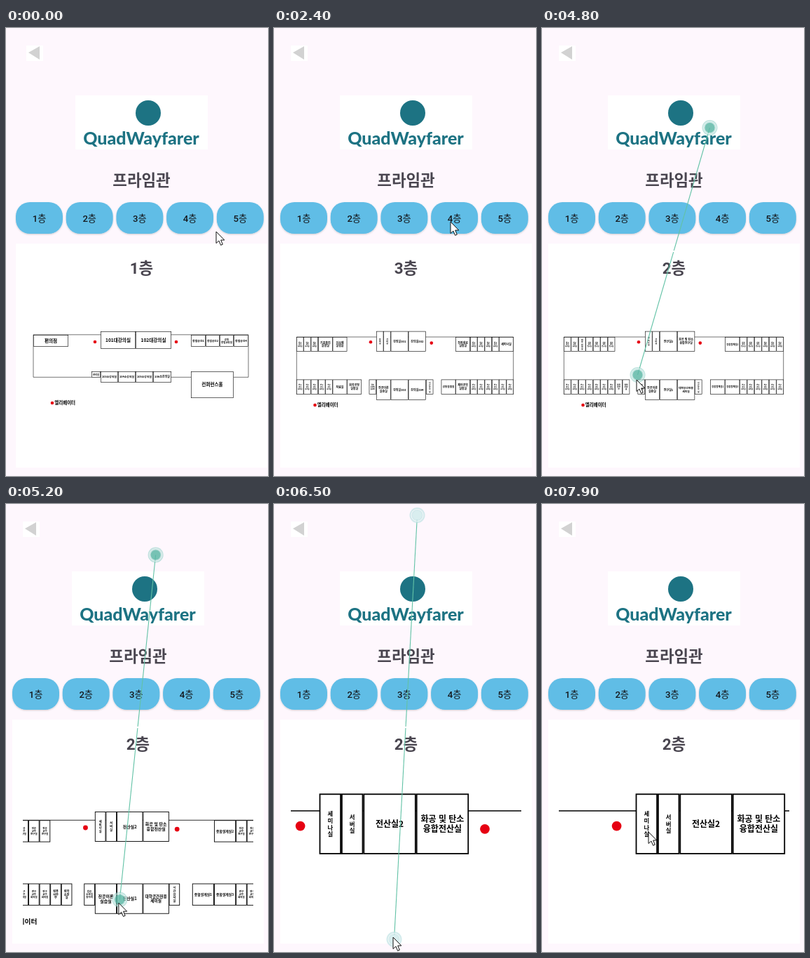
These frames come from a looping animation (374x638 px, 8 s). An HTML page:

```html
<!DOCTYPE html>
<html lang="ko">
<head>
<meta charset="utf-8">
<style>
html, body { margin: 0; width: 100%; height: 100%; overflow: hidden; background: #fef7fd; }
svg { display: block; width: 374px; height: 638px; }
text { font-family: Roboto, 'Noto Sans CJK KR', 'Noto Sans CJK', sans-serif; text-anchor: middle; }
.title { font-size: 22.4px; font-weight: 700; fill: #49454f; }
.button { font-size: 13.2px; font-weight: 500; fill: #15181c; }
.brand { font: 800 25px Lato, sans-serif; fill: #1d7383; }
.room { fill: #fff; stroke: #000; stroke-width: .6; }
.wall { fill: none; stroke: #000; stroke-width: .55; }
.label { font-family: 'Noto Sans CJK KR', 'Noto Sans CJK', sans-serif; font-weight: 700; }
.dot { fill: #e60012; }
</style>
</head>
<body>
<svg viewBox="0 0 374 638">
  <defs>
    <clipPath id="viewport"><rect x="24" y="365" width="329" height="246"/></clipPath>
    <filter id="shadow" x="-10%" y="-10%" width="120%" height="130%">
      <feDropShadow dx="0" dy="1" stdDeviation="1" flood-color="#000" flood-opacity=".18"/>
    </filter>
    <g id="touch">
      <circle r="11" fill="#8fd0c6" opacity=".55"/>
      <circle r="9" fill="none" stroke="#fff" stroke-opacity=".6"/>
      <circle r="7" fill="#4fb09c" opacity=".65"/>
    </g>
    <g id="hover">
      <circle r="11" fill="#c4e4e6" opacity=".75"/>
      <circle r="8.5" fill="none" stroke="#fff" stroke-opacity=".7"/>
      <circle r="6.5" fill="#d9eeef"/>
    </g>
  </defs>
  <rect width="374" height="638" fill="#fef7fd"/>
  <g id="screen">
    <rect x="24" y="25" width="24" height="22" fill="#fff"/>
    <path d="M27 35L43 26V45Z" fill="#d2d2d2"/>
    <rect x="94" y="96" width="189" height="77" fill="#fff"/>
    <circle cx="198" cy="121" r="18" fill="#1d7383"/>
    <text class="brand" x="188" y="166">QuadWayfarer</text>
    <text class="title" x="188.5" y="225">프라임관</text>
    <g id="buttons"></g>
    <rect x="9" y="307" width="359" height="319" fill="#fff"/>
    <text class="title" x="188.5" y="350" id="level"></text>
    <g clip-path="url(#viewport)"><g id="plan"></g></g>
  </g>
  <g id="pinch">
    <line id="span" stroke="#62c2a6" stroke-width="1.1"/>
    <circle cx="188" cy="318" r="1.2" fill="#fff"/>
    <use id="finger"/>
    <use id="mirror"/>
  </g>
  <path id="cursor" d="M0 0V16.5L3.9 13L6.6 19.3L9.3 18.1L6.7 12H11.8Z" fill="#fff" stroke="#111" stroke-linejoin="round"/>
</svg>
<script>
const LOOP = 8000, STEP = 100;
const $ = id => document.getElementById(id);

const charWidth = c => c === ' ' ? .22 : /\d/.test(c) ? .6 : .92;
const emWidth = s => [...s].reduce((sum, c) => sum + charWidth(c), 0);

function room(x, y, w, h, label, cap) {
  const lines = label.split('/');
  const widest = Math.max(...lines.map(emWidth));
  const limit = w < 12 ? 2.8 : cap;
  const size = Math.min(limit, (w - 4) / widest, (h - 2) / lines.length / 1.15);
  const text = lines.map((line, i) => {
    const ty = y + h / 2 + (i - (lines.length - 1) / 2) * size * 1.17 + size * .36;
    return `<text class="label" font-size="${size}" x="${x + w / 2}" y="${ty}">${line}</text>`;
  }).join('');
  return `<rect class="room" x="${x + .3}" y="${y + .3}" width="${w - .6}" height="${h - .6}"/>${text}`;
}

// spec: "units label*repeat" entries, laid out from left to right
function row(x, y, h, unit, spec, cap = 4) {
  let out = '';
  for (const entry of spec.split(',')) {
    const [, units, label, count = 1] = entry.match(/^([\d.]+) (.*?)(?:\*(\d+))?$/);
    for (let i = 0; i < count; i++, x += units * unit) out += room(x, y, units * unit, h, label, cap);
  }
  return out;
}

const wall = d => `<path class="wall" d="${d}"/>`;
const dot = (x, y) => `<circle class="dot" cx="${x}" cy="${y}" r="2.3"/>`;
const legend = (x, y) => dot(x, y) +
  `<text class="label" font-size="6.5" style="text-anchor:start" x="${x + 3.2}" y="${y + 2.4}">엘리베이터</text>`;

function groundFloor() {
  return wall('M34 436.8H341V497.3H320M34 436.8V497.3H117M231 497.3H259') +
    row(34, 437, 17, 1, '50 편의점', 6.6) +
    row(130, 432, 25, 1, '50 101대강의실,51 102대강의실', 6.6) +
    row(259, 437, 17, 1, '21 창업공간1,20 창업공간2,20 공동/창업교육실,21 창업공간4') +
    row(117, 489, 9, 1, '13 관리실') +
    row(130, 489, 16, 1, '25 103소강의실,25 104소강의실,25 105소강의실,26 106소강의실') +
    row(259, 489, 38, 1, '61 컨퍼런스홀', 6.6) +
    dot(122, 447) + dot(238, 447) + legend(61, 534);
}

function upperFloor(x0, x1, mid, rows) {
  const u = (x1 - x0) / 30, [left, center, right, lowLeft, lowCenter, lowRight, side] = rows;
  const top = 440, low = 500.6;
  return wall(`M${x0 + .3} 522V${top}H${x1 - .3}V522`) +
    row(x0, top, 21, u, left) + row(mid, 431.8, 28.8, u, center) + row(x1 - 8 * u, top, 21, u, right) +
    row(x0, low, 21, u, lowLeft) + row(mid - u, low, 21, u, side[0]) + row(mid, low, 29, u, lowCenter) +
    row(mid + 71, low, 21, u, side[1]) + row(x1 - 10 * u, low, 21, u, lowRight) +
    dot(138, 447.2) + dot(mid + 78.8, 448.6) + legend(58.5, 537);
}

const office = '1 연구/교수/회의실', store = '1 자/료/보/관/실';
const side = ['1 컴공/소모임/동아리', '1 시/간/강/사/실'];
const floors = [
  groundFloor(),
  upperFloor(31, 345, 147, [
    office + '*2,1 대/학/원/생/실,1 전공/교수/연구실*4',
    '1 세/미/나/실,1 서/버/실,2.4 전산실2,2.4 화공 및 탄소/융합전산실',
    '2 종합설계실2,1 전공/교수/연구실*3,' + office + '*3',
    office + '*7,1 컴퓨/사무/부,1 컴학/소장/실',
    '2 전공이론/실습실,2.4 전산실1,2.4 대학공간전용/세미실',
    '2 종합설계실1,2 종합설계실3,' + office + '*6', side]),
  upperFloor(32, 342, 146, [
    office + '*3,2 기초물리/실험실,2 신소재/실험실',
    '1 준/비/실,1 서/버/실,2.43 강의실301,2.43 강의실302',
    '2 전자회로/실험실,' + office + '*4,2 세미나실',
    office + '*5,2 자료실,2 화학공정/실험실',
    '2 전공이론/실습실,2.43 강의실303,2.43 강의실304',
    '2 공동실험실,2 제어공학/실험실,' + office + '*6', side]),
  upperFloor(32, 342, 146, [
    office + ',2 재료공학/실험실,' + office + '*4',
    '1.72 강의실/401*2,1.72 강의실/403*2',
    office + '*2,2 정밀측정/실험실,' + office + '*4',
    office + '*2,2 유체역학/실험실,' + office + '*3,2 통신공학/실험실',
    '1.72 강의실/405*2,1.72 강의실/407*2',
    office + '*4,2 열전달/실험실,' + office + '*4', side]),
  upperFloor(32, 342, 146, [
    office + ',2 플라스마/공학실험실,2 에너지공정/과제실험실,' + office + ',' + store,
    '1.72 탄소소재/실험실,1.72 탄소소재/실습실,1.72 나노공정/융합실험실,1.72 501/종합강의실',
    store + ',' + office + ',2 촉매반응기/실험실,2 에너지변환/화학연구실,' + office + '*2',
    office + ',2 나노소자/과제실험실,' + store + ',' + office + '*3,2 로비홀/전동실/관리',
    '1.72 공업응용화/학실험실,1.72 502/종합강의실,1.72 503/종합강의실,1.72 504/종합강의실',
    office + ',' + store + ',' + office + '*2,2 고분자/재료연구실,2 분자재료/화학실험실,' + office + '*2',
    [store, store]])
];

$('buttons').innerHTML = [1, 2, 3, 4, 5].map((n, i) => {
  const x = 9 + i * 71.7;
  return `<rect x="${x}" y="248" width="67" height="45" rx="20" fill="#60bde6" filter="url(#shadow)"/>
    <text class="button" x="${x + 33.5}" y="276">${n}층</text>`;
}).join('');

// Rows are [time, ...values]
const cursorPath = [
  [300, 300, 290], [900, 110, 277], [1200, 110, 277], [1600, 179, 275], [2000, 179, 275],
  [2300, 252, 276], [2550, 252, 276], [2800, 325, 277], [3050, 325, 277], [3400, 107, 271],
  [4000, 107, 271], [4600, 135, 501], [4800, 135, 501], [5700, 197, 662], [6000, 194, 660],
  [6500, 170, 617], [6700, 170, 617], [7100, 83, 468], [7300, 83, 468], [7900, 152, 467]
];
const zoomPath = [[4800, 1, 419], [5700, 2.1, 419], [6200, 3, 441.5]];
const levels = [[0, 1], [1100, 2], [1900, 3], [2500, 4], [3000, 5], [3900, 2]];

const clamp = v => Math.max(0, Math.min(1, v));
const ease = v => v * v * (3 - 2 * v);

function sample(path, t, curve = ease) {
  const next = path.findIndex(key => key[0] > t);
  if (next === 0) return path[0].slice(1);
  if (next < 0) return path[path.length - 1].slice(1);
  const a = path[next - 1], b = path[next];
  const k = curve((t - a[0]) / (b[0] - a[0]));
  return a.slice(1).map((v, i) => v + (b[i + 1] - v) * k);
}

const move = (id, x, y) => $(id).setAttribute('transform', `translate(${x} ${y})`);
let shown = 0;

function draw(t) {
  move('screen', 5 * (1 - clamp((t - 50) / 200)), 0);

  const level = levels.filter(key => key[0] <= t).pop()[1];
  if (level !== shown) {
    shown = level;
    $('level').textContent = level + '층';
    $('plan').innerHTML = floors[level - 1];
  }

  const [x, y] = sample(cursorPath, t);
  move('cursor', x, y);

  const [scale, focusY] = sample(zoomPath, t, v => v);
  const drag = t >= 7300 ? x - 83 : 0;
  $('plan').setAttribute('transform',
    `translate(${188.2 * (1 - scale) + drag} ${focusY * (1 - scale)}) scale(${scale})`);

  const active = t >= 4600 && t < 6700;
  $('pinch').style.display = active ? '' : 'none';
  if (active) {
    const fx = x + 1.5, fy = y - 7 + 10 * clamp((t - 4800) / 1700);
    const mx = 376 - fx, my = 636 - fy;
    const pressed = t >= 4700 && t < 6400;
    move('finger', fx, fy);
    move('mirror', mx, my);
    Object.entries({ x1: fx, y1: fy, x2: mx, y2: my }).forEach(([k, v]) => $('span').setAttribute(k, v));
    for (const id of ['finger', 'mirror']) $(id).setAttribute('href', pressed ? '#touch' : '#hover');
  }
}

const start = performance.now();
function tick() {
  const t = (performance.now() - start) % LOOP;
  draw(Math.floor(t / STEP) * STEP);
  requestAnimationFrame(tick);
}
tick();
</script>
</body>
</html>
```
